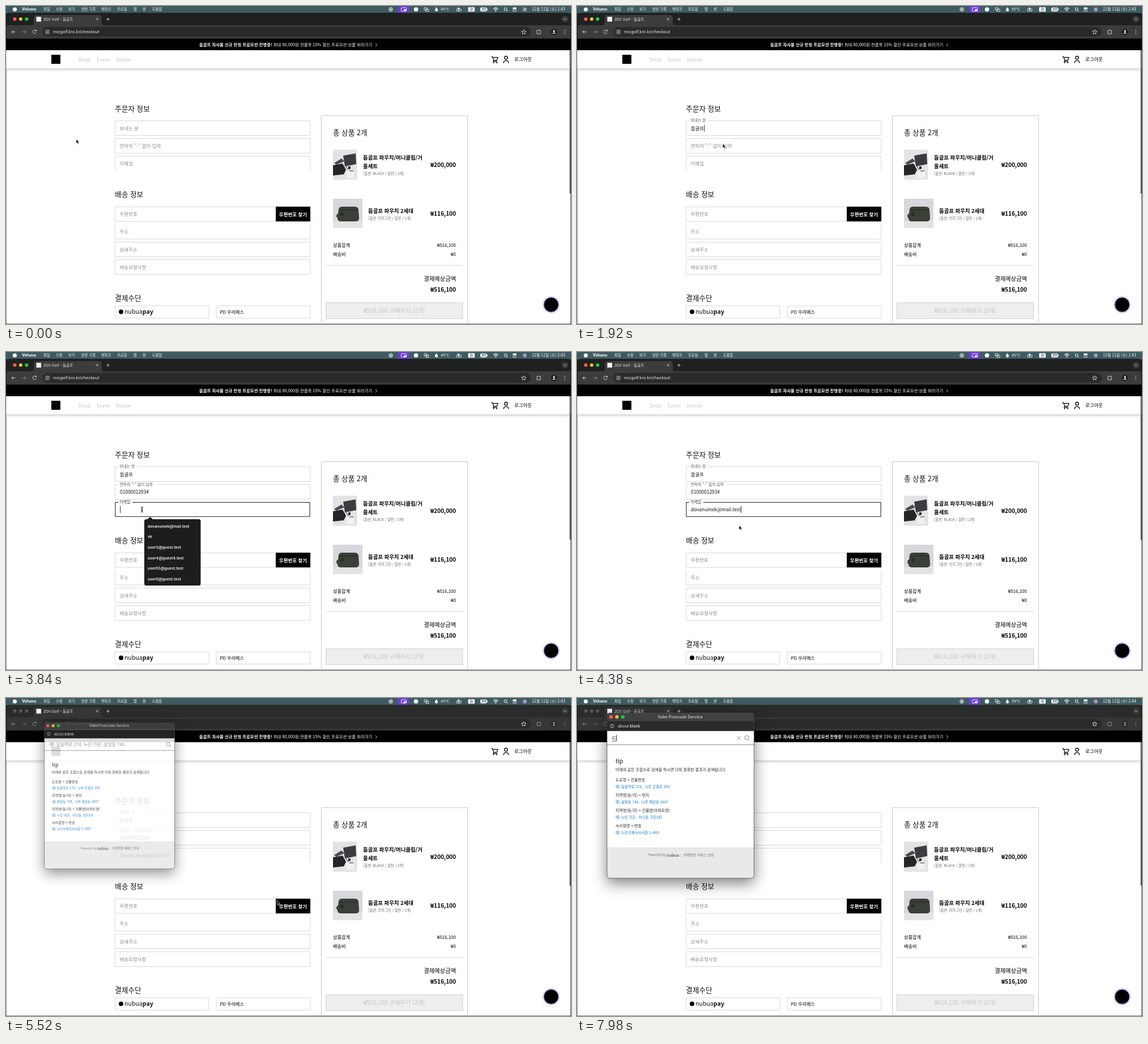
Animation, 997 px wide and 561 px high, one loop 8000 ms. Source, as an HTML page:

```html
<!DOCTYPE html>
<html lang="ko">
<head>
<meta charset="utf-8">
<style>
html, body { margin: 0; width: 100%; height: 100%; overflow: hidden; background: #111; }
svg { display: block; width: 997px; height: 561px; }
text { font-family: "Noto Sans CJK KR", "Noto Sans CJK", "Noto Sans", sans-serif; white-space: pre; }
.ui { font-family: Inter, "Noto Sans CJK KR", sans-serif; }
</style>
</head>
<body>
<svg id="stage" viewBox="0 0 997 561" xmlns="http://www.w3.org/2000/svg"></svg>
<script>
const LOOP = 8000;
const clamp = v => Math.max(0, Math.min(1, v));
const ramp = (t, start, length) => clamp((t - start) / length);
const easeInOut = p => p * p * (3 - 2 * p);
const easeOut = p => 1 - (1 - p) * (1 - p);

const text = (x, y, s, size, fill = '#000', extra = '') =>
  `<text x="${x}" y="${y}" font-size="${size}" fill="${fill}" ${extra}>${s}</text>`;
const rect = (x, y, w, h, fill, extra = '') =>
  `<rect x="${x}" y="${y}" width="${w}" height="${h}" fill="${fill}" ${extra}/>`;
const dot = (x, y, r, fill, extra = '') =>
  `<circle cx="${x}" cy="${y}" r="${r}" fill="${fill}" ${extra}/>`;
const line = (d, stroke, width = 1, extra = '') =>
  `<path d="${d}" fill="none" stroke="${stroke}" stroke-width="${width}" ${extra}/>`;
const group = (id, body, extra = '') => `<g id="${id}" ${extra}>${body}</g>`;
const UI = ' class="ui" ';
const BOLD = ' font-weight="700" ';
const MEDIUM = ' font-weight="500" ';
const END = ' text-anchor="end" ';
const MIDDLE = ' text-anchor="middle" ';

function menuBar() {
  const items = [['파일', 66], ['수정', 88], ['보기', 110], ['방문 기록', 133], ['북마크', 168],
    ['프로필', 196], ['탭', 225], ['창', 241], ['도움말', 258]];
  const w = '#fff';
  return rect(0, 0, 997, 13, '#3f5b61') +
    dot(15.5, 6, 3.6, w) +
    text(28, 8.4, 'Velumo', 6.9, w, UI + BOLD) +
    items.map(([s, x]) => text(x, 8.3, s, 6.3, w, MEDIUM)).join('') +
    dot(679, 6, 3.2, 'none', 'stroke="#fff"') + dot(679, 6, 1.5, w) +
    rect(692, 0, 19.5, 12.5, '#6a3fd6', 'rx="2"') +
    rect(697.5, 3, 9, 6, 'none', 'stroke="#fff" stroke-width=".9" rx="1"') + rect(702, 6, 4, 2.5, w) +
    dot(723.5, 6, 3.8, w) +
    line('M738 3h5v4h-5zM741 5.5h5v4h-5z', w, .8) +
    `<path d="M759.5 2c1.5 2.4 2.5 3.4 2.5 5a2.5 2.5 0 0 1-5 0c0-1.6 1-2.6 2.5-5z" fill="#fff"/>` +
    text(767, 8.3, '', 6.3, w, UI + 'id="temp"') +
    dot(797, 7, 2.2, 'none', 'stroke="#fff" stroke-width=".9"') +
    dot(801, 7, 2.2, 'none', 'stroke="#fff" stroke-width=".9"') + dot(798.5, 4, 1.5, w) +
    rect(815.5, 2, 11.5, 8, w, 'rx="1.5"') + text(818.4, 8.3, '한', 6.2, '#3f5b61', BOLD) +
    rect(837, 2.5, 11.5, 7, w, 'rx="2"') + rect(849, 4.7, 1, 2.6, w) +
    text(839.5, 8.3, '89', 5.6, '#3f5b61', UI + BOLD) +
    line('M860 5.2q4.2-4 8.4 0M861.7 7q2.5-2.3 5 0', w, 1.1) + dot(864.2, 8.7, 1, w) +
    dot(881.5, 5.5, 2.4, 'none', 'stroke="#fff"') + line('M883.3 7.3l2.2 2.2', w) +
    rect(894, 2.6, 7, 3, w, 'rx="1.5"') +
    rect(894.3, 6.8, 6.4, 2.6, 'none', 'rx="1.3" stroke="#fff" stroke-width=".7"') +
    dot(915.5, 6, 3.4, '#a49ac0') +
    text(928, 8.4, '', 6.95, w, MEDIUM + 'id="clock"');
}

function browser() {
  const c = '#d0d0d0';
  return rect(1, 12, 995, 30, '#1f2020', 'rx="5" id="strip"') +
    ['#ff5f57', '#febc2e', '#28c840'].map((f, i) => dot(15.5 + i * 10.4, 23, 3.1, f, 'class="light"')).join('') +
    `<g class="tool"><path d="M45 34q4 0 4-4v-9q0-5 5-5h110q5 0 5 5v9q0 4 4 4z" fill="#3c3c3c"/></g>` +
    rect(53.5, 19, 8.5, 8.5, '#f4f4f4') +
    text(66, 25.6, 'ZOV Golf - 둡골프', 6.5, '#e8e8e8', UI) +
    line('M159 21.2l4 4m0-4l-4 4M177 23.3h6m-3-3v6', c, .9) +
    dot(986.5, 23, 6, '#393a3a') + line('M984 22l2.5 2.5L989 22', c, 1) +
    `<g class="tool">${rect(1, 34, 995, 24, '#3c3c3c')}</g>` +
    rect(64, 37, 862, 17, '#292a2a', 'rx="8.5"') +
    `<g class="icons">` +
    line('M16.5 45.7h-6.5m3-3l-3 3 3 3', c, 1) +
    line('M28.7 45.7h6.5m-3-3l3 3-3 3', '#888', 1) +
    line('M53 43.6a3.2 3.2 0 1 0 .4 3.2M53.6 41.8v2.4h-2.4', c, 1) +
    dot(73, 45.7, 5.6, '#454646') +
    line('M70 44h3.4M72.6 47.4H76', c, .9) + dot(74.6, 44, 1, c) + dot(71.4, 47.4, 1, c) +
    line('M937 43h2.2q.8-2 1.6 0h2.4v2q-1.6.8 0 1.8v2.2H937z', c, 1) +
    dot(967, 45.7, 5.2, '#1a1a1a') + dot(967, 44.2, 1.6, '#fff') +
    `<path d="M963.9 48.6q3.1-4 6.2 0z" fill="#fff"/>` +
    [42.6, 45.7, 48.8].map(y => dot(986, y, .8, c)).join('') + `</g>` +
    text(83, 48.3, 'micgolf.kro.kr/checkout', 7.3, '#eee', UI) +
    line('M913.5 41.8l1.2 2.6 2.8.3-2.1 1.9.6 2.8-2.5-1.4-2.5 1.4.6-2.8-2.1-1.9 2.8-.3z', '#e4e4e4', .9);
}

function header() {
  return rect(1, 57.5, 995, 21, '#000') +
    text(341, 71.4, `<tspan ${BOLD}>둡골프 자사몰 신규 런칭 프로모션 진행중!</tspan> 최대 80,000원 전품목 15% 할인 프로모션 상품 보러가기`,
      7.4, '#fff') +
    line('M652 66l2.6 2.7-2.6 2.7', '#fff', .8) +
    rect(1, 104, 995, 6, '#fff', 'style="filter:drop-shadow(0 2px 2.5px rgba(0,0,0,.22))"') +
    rect(.5, 78, 995.8, 32, '#fff') +
    rect(80, 86, 16, 16, '#000') +
    [['Shop', 127.5], ['Event', 160], ['Notice', 194]].map(([s, x]) => text(x, 98, s, 8.8, '#c6c6c6')).join('') +
    line('M856 89h2l3 6.8h5l2-5.2h-8.6M861 95.8l-1.4 2h7.6', '#000', 1.2) +
    dot(860.5, 100, 1.1, '#000') + dot(866, 100, 1.1, '#000') +
    dot(882.4, 91.2, 2.7, 'none', 'stroke="#000" stroke-width="1.3"') +
    line('M878.3 100.8v-1.5q0-3 4.1-3t4.1 3v1.5', '#000', 1.3) +
    text(897, 97.2, '로그아웃', 8.4);
}

const BORDER = '#d3d3d3';
const inputs = [
  { id: 'name', y: 202.5, label: '보내는 분', gap: 33, at: 1150 },
  { id: 'phone', y: 233.7, label: '연락처 "-" 없이 입력', gap: 67, at: 2150 },
  { id: 'mail', y: 265, label: '이메일', gap: 25, at: 3610, open: 'bottom' }
];

function box(x, y, w, h, open) {
  const edge = (side, d) => side === open ? `m${d} 0` : `h${d}`;
  return line(`M${x} ${y}${edge('top', w)}v${h}${edge('bottom', -w)}v${-h}`, BORDER, .9);
}

function form() {
  const hint = '#8c8c8c';
  const plain = [['주소', 385, 'top'], ['상세주소', 416.5], ['배송요청사항', 447.7]];
  return [['주문자 정보', 185.6], ['배송 정보', 337.4], ['결제수단', 520.2]]
    .map(([s, y]) => text(192.3, y, s, 12.6, '#111', MEDIUM)).join('') +
    inputs.map(f => box(192.5, f.y, 344.3, 26, f.open) +
      rect(198, f.y - 1.5, f.gap, 3, '#fff', `id="${f.id}-gap"`) +
      text(200.5, 0, f.label, 8.5, hint, `id="${f.id}-label"`) +
      text(201, f.y + 16.4, '', 8.35, '#111', `id="${f.id}-value"`)).join('') +
    rect(193, 265.3, 343, 25, 'none', 'stroke="#222" stroke-width="1" id="focus"') +
    rect(198, 263, 25, 4, '#fff', 'id="focus-gap"') +
    text(200.5, 266.9, '이메일', 6.8, '#555', 'id="focus-label"') +
    box(192.5, 354.3, 344.3, 25.7) + text(200.5, 370.4, '우편번호', 8.5, hint) +
    rect(476, 354, 61, 26, '#000') + text(506.5, 370.6, '우편번호 찾기', 8.5, '#fff', BOLD + MIDDLE) +
    plain.map(([s, y, open]) => box(192.5, y, 344.3, 26, open) + text(200.5, y + 16.2, s, 8.5, hint)).join('') +
    box(192.5, 529, 165.5, 21.5) + box(371, 529, 165.8, 21.5) +
    dot(203, 539.5, 4, '#000') +
    text(209, 543, `nubua<tspan ${BOLD}>pay</tspan>`, 10.6, '#111') +
    text(377.5, 543, 'PD 우라메스', 8, '#000', MEDIUM);
}

function summary() {
  const price = (y, s, size, extra = '') => text(794, y, s, size, '#000', END + extra);
  return line('M556.5 561V193.5H814.5V561', '#c9c9c9', 1) +
    text(577, 228, '총 상품 2개', 12.6, '#111', MEDIUM) +
    rect(577, 253.5, 42.5, 53, '#e3e3e5') +
    `<path d="M595 264l22-4 1 19-20 4z" fill="#3b3c3f"/><path d="M577 281l17-3 6 11-4 8-19 2z" fill="#242528"/>` +
    `<path d="M579 277l13-8 5 5-14 6z" fill="#4a4b4e"/>` +
    line('M600 283l3 5 4-1M606 291h7', '#333') +
    rect(604, 283, 4, 4, '#222') + rect(601, 292, 13, 11, '#f1f1f1') +
    text(630, 271.3, '둡골프 파우치/머니클립/거', 9.4, '#000', BOLD) +
    text(630, 286, '울세트', 9.4, '#000', BOLD) +
    text(630, 298, '[옵션: BLACK / 일반 / 2개]', 6.35, '#666') +
    price(284.2, '₩200,000', 10.1, BOLD) +
    rect(577, 340, 52, 52, '#d7d7dc') + rect(577, 379, 52, 13, '#e3e3e6') +
    `<path d="M587 358q1-4 6-4h22q6 0 7 5l1 15q0 6-6 6h-26q-6 0-6-6z" fill="#3a4037"/>` +
    line('M588 361q15-3 32-1', '#20251f', 1) + line('M586 367q-4 3 0 7', '#272c26', 2) +
    dot(593, 367, 3, '#272c26') +
    text(639, 364.7, '둡골프 파우치 2세대', 9.4, '#000', BOLD) +
    text(639, 376.6, '[옵션: 러프그린 / 일반 / 1개]', 6.35, '#666') +
    price(370, '₩116,100', 10.1, BOLD) +
    text(577, 425, '상품합계', 8.2, '#000', MEDIUM) + price(424.8, '₩516,100', 8) +
    text(577, 441.4, '배송비', 8.2, '#000', MEDIUM) + price(441.2, '₩0', 8) +
    line('M564 457.5H806', '#d6d6d6', .9) +
    price(485, '결제예상금액', 10.3, MEDIUM) + price(503.8, '₩516,100', 10.1, BOLD) +
    rect(564.5, 523.5, 241.5, 28, '#eee', 'stroke="#cfcfcf" stroke-width=".9"') +
    text(685, 541.4, '₩516,100 구매하기 (2개)', 10.3, '#c4c4c4', MIDDLE);
}

function suggestions() {
  const rows = ['dovanumek@mail.test', 'vk', 'user3@guest.test', 'user4@guest4.test', 'user55@guest.test', 'user5@guest.test'];
  return rect(244, 295, 99.5, 117, '#1d1d1e', 'rx="3.5"') +
    `<path d="M249 295.5l5.3-4.5 5.3 4.5z" fill="#1d1d1e"/>` +
    rows.map((s, i) => text(250, 309.6 + i * 18.7, s, 6.8, '#f2f2f2', UI + 'font-weight="600"')).join('');
}

function popup() {
  const blue = '#1479c4';
  const tips = [['도로명 + 건물번호', '예) 달솔역로 274,  나루 은결로 359'],
    ['지역명(동/리) + 번지', '예) 솔빛동 748,  나루 해담동 3607'],
    ['지역명(동/리) + 건물명(아파트명)', '예) 누린 가온,  하늬동 가온5차'],
    ['사서함명 + 번호', '예) 누린우체국사서함 2~400']];
  return rect(53, 26.5, 259.3, 291.5, '#e9e9e9', 'rx="5" style="filter:drop-shadow(0 9px 13px rgba(0,0,0,.5))"') +
    `<path d="M53 41v-9.5q0-5 5-5h249.3q5 0 5 5V41z" fill="#414042"/>` +
    ['#ff5f57', '#febc2e', '#28c840'].map((f, i) => dot(60 + i * 10.4, 33.3, 3.1, f)).join('') +
    text(182, 35.8, 'Volm Postcode Service', 7.1, '#c4c4c4', UI + 'font-weight="600"' + MIDDLE) +
    rect(53, 41, 259.3, 17.5, '#2a2a2b') +
    dot(62, 49.5, 3.3, 'none', 'stroke="#ccc" stroke-width=".8"') + line('M62 47.3v1M62 49v2.3', '#ccc', .9) +
    text(72, 52, 'about:<tspan fill="#fff">blank</tspan>', 7.2, '#e4e4e4', UI) +
    rect(53, 58.5, 259.3, 205.5, '#fff') + line('M53 82.5H312.3', '#8a8a8a', 1) +
    text(63, 73.8, '예) 달솔역로 274, 누린 가온, 솔빛동 748', 8.85, '#888', 'id="query-hint"') +
    group('query', text(61, 74, 'ㄷ', 9.4, '#111') + line('M61 76H69.5', '#333', .8) +
      line('M282.5 67.5l6 6m0-6l-6 6', '#666', .8)) +
    rect(63, 65.5, .9, 10.5, '#111', 'id="query-caret"') +
    dot(299.5, 70, 3.6, 'none', 'stroke="#777" stroke-width=".9"') + line('M302.2 72.7l2.6 2.6', '#777', 1) +
    text(68, 114.5, 'tip', 10.4, '#111', MEDIUM) +
    text(68, 128.5, '아래와 같은 조합으로 검색을 하시면 더욱 정확한 결과가 검색됩니다.', 6.92, '#222') +
    tips.map(([a, b], i) => text(68, 147.4 + i * 27, a, 6.9, '#222') + text(68, 159.4 + i * 27, b, 6.45, blue)).join('') +
    line('M53 264.3H312.3', '#d4d4d4', .7) +
    text(125, 279.4, 'Powered by', 5.7, '#777') + text(158, 279.8, 'nubua', 7.4, '#333', MEDIUM) +
    line('M183.2 274.5v5.5', '#bbb', .7) + text(188, 279.4, '우편번호 서비스 안내', 6, '#666') +
    rect(53, 26.5, 259.3, 291.5, 'none', 'rx="5" stroke="#3a3a3a" stroke-width=".7"');
}

function cursor() {
  const beam = 'M-2-4.5q2 0 2 1.5v6q0 1.5-2 1.5M2-4.5q-2 0-2 1.5v6q0 1.5 2 1.5M-1.2 1h2.4';
  return `<path id="arrow" d="M0 0v7.6l1.8-1.6 1.3 2.9 1.3-.6-1.3-2.7h2.5z" fill="#000" stroke="#fff" stroke-width=".6"/>` +
    group('beam', line(beam, '#fff', 2, 'opacity=".7"') + line(beam, '#111', .9));
}

document.getElementById('stage').innerHTML =
  rect(0, 0, 997, 561, '#141414') + menuBar() + browser() +
  rect(.5, 78, 995.8, 482.5, '#fff') + header() + form() + summary() +
  rect(994.7, 78, 1.3, 253, '#3c3c3c') +
  dot(962, 527, 13.2, '#000', 'style="filter:drop-shadow(0 0 1.5px #8b62e8)" stroke="#d9c9ff" stroke-width="1"') +
  rect(201, 272, .9, 12, '#111', 'id="caret"') +
  group('suggest', suggestions()) + group('popup', popup()) + group('cursor', cursor());

const el = id => document.getElementById(id);
const show = (id, on) => el(id).setAttribute('visibility', on ? 'inherit' : 'hidden');
const between = (t, a, b) => t >= a && t < b;
const lights = [...document.querySelectorAll('.light')];
const lightColors = lights.map(n => n.getAttribute('fill'));
const tools = [...document.querySelectorAll('.tool > *')];
const icons = document.querySelector('.icons');

const path = [[0, 124, 235], [450, 124, 235], [1000, 230, 215], [1800, 230, 215], [1910, 257, 243],
  [3250, 257, 243], [3560, 240, 278], [3880, 240, 278], [4180, 286, 306], [4450, 286, 306],
  [5100, 476, 376], [5140, 476, 376], [5270, 478, 357], [5640, 478, 357], [6090, 141, 73], [LOOP, 141, 73]];
const beamTimes = [[900, 1260], [3480, 3960], [5000, 5190], [6060, LOOP]];
const hiddenTimes = [[1260, 1800], [2260, 3200], [7660, LOOP]];
const syllables = ['', 'ㄷ', '두', '둡', '둡ㄱ', '둡고', '둡골', '둡골ㅍ', '둡골프'];
const phone = '01000012934';

function cursorAt(t) {
  const i = path.findIndex(k => k[0] > t);
  const [t0, x0, y0] = path[i - 1], [t1, x1, y1] = path[i];
  const p = easeInOut((t - t0) / (t1 - t0));
  return [x0 + (x1 - x0) * p, y0 + (y1 - y0) * p];
}

function drawInputs(t) {
  const values = {
    name: syllables[Math.floor(ramp(t, 1230, 520) * 8)],
    phone: phone.slice(0, Math.floor(ramp(t, 2260, 850) * 11)),
    mail: t >= 4350 ? 'dovanumek@mail.test' : ''
  };
  for (const f of inputs) {
    const p = easeOut(ramp(t, f.at, 150));
    const label = el(f.id + '-label');
    label.setAttribute('font-size', 8.5 - 1.7 * p);
    label.setAttribute('y', f.y + 16.2 - 14.3 * p);
    label.setAttribute('fill', p > .5 ? '#555' : '#8c8c8c');
    show(f.id + '-gap', p > .6);
    el(f.id + '-value').textContent = values[f.id];
  }
  const focused = between(t, 3760, 4900);
  ['focus', 'focus-gap', 'focus-label'].forEach(id => show(id, focused));
  const field = inputs.findLast(f => t >= f.at) || inputs[0];
  const width = values[field.id] ? el(field.id + '-value').getComputedTextLength() : 0;
  el('caret').setAttribute('x', 201.3 + width);
  el('caret').setAttribute('y', field.y + 7);
  show('caret', between(t, 1150, 5000) && (t - field.at) % 1000 < 800);
  show('suggest', between(t, 3700, 4350));
}

function drawPopup(t) {
  const open = t >= 5450;
  const p = easeOut(ramp(t, 5460, 200));
  const s = .765 + .235 * p;
  show('popup', open);
  el('popup').setAttribute('opacity', Math.min(1, p * 1.68));
  el('popup').setAttribute('transform', `translate(182.5 172) scale(${s}) translate(-182.5 -172)`);
  const typed = t >= 7700;
  show('query', open && typed);
  show('query-hint', open && !typed);
  show('query-caret', typed || t >= 6400 && (t - 6400) % 1000 < 500);
  el('query-caret').setAttribute('x', typed ? 69 : 63);
  lights.forEach((n, i) => n.setAttribute('fill', open ? '#555656' : lightColors[i]));
  tools.forEach(n => n.setAttribute('fill', open ? '#353636' : '#3c3c3c'));
  el('strip').setAttribute('fill', open ? '#2a2b2b' : '#1f2020');
  icons.setAttribute('opacity', open ? .55 : 1);
}

function render(t) {
  el('temp').textContent = (between(t, 1200, 3100) ? 55 : t >= 7100 ? 59 : 45) + '°C';
  el('clock').textContent = '12월 11일 (수) 2:' + (t < 7300 ? 43 : 44);
  drawInputs(t);
  drawPopup(t);
  const within = list => list.some(([a, b]) => between(t, a, b));
  const visible = !within(hiddenTimes), beam = within(beamTimes);
  const [x, y] = cursorAt(t);
  el('cursor').setAttribute('transform', `translate(${x} ${y})`);
  show('arrow', visible && !beam);
  show('beam', visible && beam);
}

const start = performance.now();
function tick() {
  render((performance.now() - start) % LOOP);
  requestAnimationFrame(tick);
}
tick();
</script>
</body>
</html>
```
